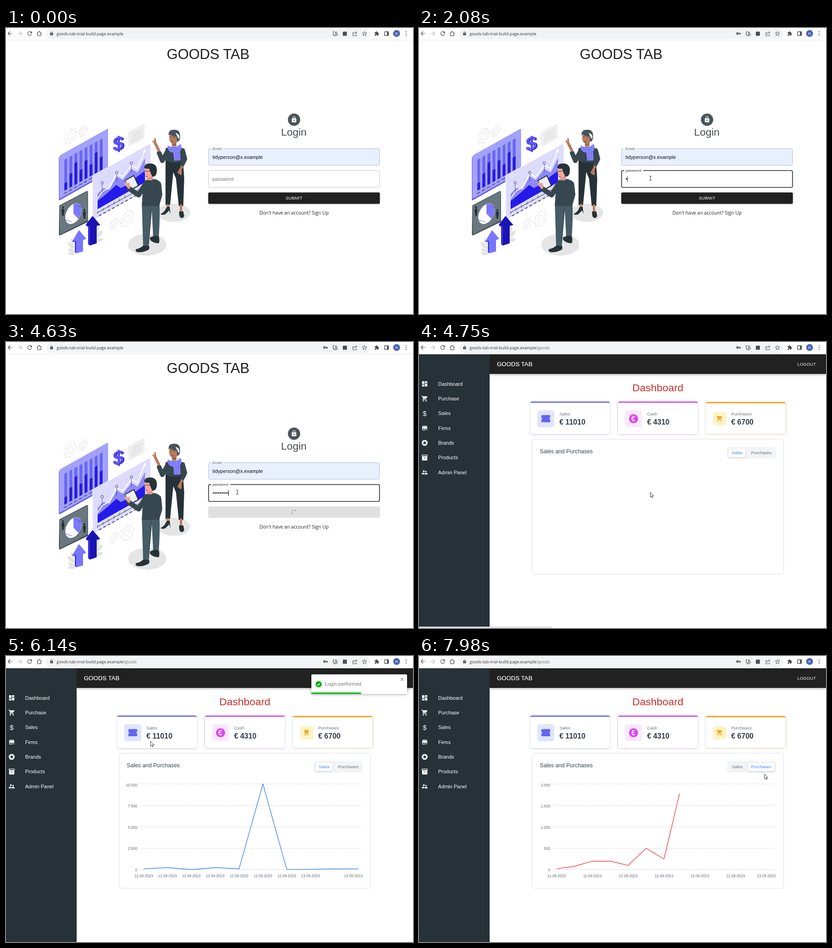
These frames come from a looping animation (893 by 627 pixels, 8 s). An HTML page:

```html
<!DOCTYPE html>
<html lang="en">
<head>
<meta charset="utf-8">
<title>Goods dashboard</title>
<style>
html, body { margin: 0; width: 100%; height: 100%; overflow: hidden; background: #fff; }
svg { display: block; width: 893px; height: 627px; font-family: "Liberation Sans", Arial, sans-serif; }
.ui { font-family: "Open Sans", "Noto Sans", sans-serif; }
.faint { filter: drop-shadow(0 .5px .8px rgba(0,0,0,.1)); }
.soft { filter: drop-shadow(0 1px 1.5px rgba(0,0,0,.2)); }
.deep { filter: drop-shadow(0 1px 3px rgba(0,0,0,.35)); }
</style>
</head>
<body>
<svg id="stage" viewBox="0 0 893 627" xmlns="http://www.w3.org/2000/svg"></svg>
<script>
const LOOP = 8000, BLUE = '#3b82f6', INK = '#263238', SLATE = '#37474f', SKIN = '#b97a5c';
const APP = 'GOODS TAB';

// ---------- drawing helpers ----------
const text = (x, y, s, size, fill, extra = '') =>
  `<text x="${x}" y="${y}" font-size="${size}" fill="${fill}" ${extra}>${s}</text>`;
const rect = (x, y, w, h, fill, r = 0, extra = '') =>
  `<rect x="${x}" y="${y}" width="${w}" height="${h}" rx="${r}" fill="${fill}" ${extra}/>`;
const circle = (x, y, r, fill, extra = '') => `<circle cx="${x}" cy="${y}" r="${r}" fill="${fill}" ${extra}/>`;
const ellipse = (x, y, rx, ry, fill, extra = '') =>
  `<ellipse cx="${x}" cy="${y}" rx="${rx}" ry="${ry}" fill="${fill}" ${extra}/>`;
const shape = (d, fill, extra = '') => `<path d="${d}" fill="${fill}" ${extra}/>`;
const line = (d, stroke, w = 1, extra = '') =>
  `<path d="${d}" fill="none" stroke="${stroke}" stroke-width="${w}" ${extra}/>`;
const limb = (d, stroke, w) => line(d, stroke, w, 'stroke-linecap="round" stroke-linejoin="round"');
const group = (id, body, extra = '') => `<g id="${id}" ${extra}>${body}</g>`;
const icon = (x, y, scale, d, fill) =>
  `<path transform="translate(${x} ${y}) scale(${scale}) translate(-12 -12)" d="${d}" fill="${fill}" fill-rule="evenodd"/>`;
const range = n => [...Array(n).keys()];
const MID = 'text-anchor="middle"', END = 'text-anchor="end"';

const ICON = {
  back: 'M20 11H7.8l5.6-5.6L12 4l-8 8 8 8 1.4-1.4L7.8 13H20z',
  forward: 'M4 11h12.2l-5.6-5.6L12 4l8 8-8 8-1.4-1.4 5.6-5.6H4z',
  reload: 'M17.65 6.35A8 8 0 1 0 19.73 14h-2.08A6 6 0 1 1 12 6c1.66 0 3.14.69 4.22 1.78L13 11h7V4z',
  home: 'M12 3L2 12h3v9h14v-9h3zM7 19v-8.8l5-4.5 5 4.5V19z',
  lock: 'M18 8h-1V6a5 5 0 0 0-10 0v2H6a2 2 0 0 0-2 2v10a2 2 0 0 0 2 2h12a2 2 0 0 0 2-2V10a2 2 0 0 0-2-2zm-6 9a2 2 0 1 1 0-4 2 2 0 0 1 0 4zm3.1-9H8.9V6a3.1 3.1 0 0 1 6.2 0z',
  key: 'M12.65 10A6 6 0 1 0 12.65 14H17v4h4v-4h2v-4zM7 14a2 2 0 1 1 0-4 2 2 0 0 1 0 4z',
  puzzle: 'M20.5 11H19V7a2 2 0 0 0-2-2h-4V3.5a2.5 2.5 0 0 0-5 0V5H4a2 2 0 0 0-2 2v3.8h1.5a2.7 2.7 0 0 1 0 5.4H2V20a2 2 0 0 0 2 2h3.8v-1.5a2.7 2.7 0 0 1 5.4 0V22H17a2 2 0 0 0 2-2v-4h1.5a2.5 2.5 0 0 0 0-5z',
  dashboard: 'M3 13h8V3H3zm0 8h8v-6H3zm10 0h8V11h-8zm0-18v6h8V3z',
  cart: 'M9 20a2 2 0 1 1-4 0 2 2 0 0 1 4 0zM1 2v2h2l3.6 7.6-1.35 2.44A2 2 0 0 0 7 17h12v-2H7.4l1-2h7.2c.75 0 1.4-.4 1.7-1L21 5.5A1 1 0 0 0 20 4H5.2l-.9-2zM19 20a2 2 0 1 1-4 0 2 2 0 0 1 4 0z',
  store: 'M20 4H4v2h16zm1 10v-2l-1-5H4l-1 5v2h1v6h10v-6h4v6h2v-6zm-9 4H6v-4h6z',
  star: 'M12 2a10 10 0 1 0 0 20 10 10 0 1 0 0-20zm4.24 16L12 15.45 7.77 18l1.12-4.81-3.73-3.23 4.92-.42L12 5l1.92 4.53 4.92.42-3.73 3.23z',
  box: 'M20 2H4a2 2 0 0 0-2 2v3c0 .7.4 1.3 1 1.7V20a2 2 0 0 0 2 2h14a2 2 0 0 0 2-2V8.7c.6-.4 1-1 1-1.7V4a2 2 0 0 0-2-2zm-5 12H9v-2h6zm5-7H4V4h16z',
  people: 'M16.5 12a2.5 2.5 0 1 0 0-5 2.5 2.5 0 0 0 0 5zM9 11a3 3 0 1 0 0-6 3 3 0 0 0 0 6zm7.5 3c-1.8 0-5.5.9-5.5 2.75V19h11v-2.25c0-1.85-3.7-2.75-5.5-2.75zM9 13c-2.3 0-7 1.17-7 3.5V19h7v-2.25c0-.85.3-2.3 2.4-3.5z',
  ticket: 'M22 10V6a2 2 0 0 0-2-2H4a2 2 0 0 0-2 2v4a2 2 0 0 1 0 4v4a2 2 0 0 0 2 2h16a2 2 0 0 0 2-2v-4a2 2 0 0 1 0-4z'
};

// ---------- browser bar ----------
function browserBar() {
  const tint = '#4d5156';
  return rect(0, 0, 893, 27, '#fff') + rect(0, 26, 893, 1, '#e2e4e6') + rect(88, 2, 711, 22, '#f1f3f4', 11) +
    icon(8.5, 12, .62, ICON.back, tint) + icon(30.5, 12, .62, ICON.forward, '#b9bcbf') +
    icon(52, 12, .62, ICON.reload, tint) + icon(73, 12, .6, ICON.home, tint) + icon(100, 12, .4, ICON.lock, tint) +
    `<text class="ui" x="111" y="15.6" font-size="9" fill="#303236">goods-tab-trial-build.page.example<tspan id="urlPath" fill="#6b6f73">/goods</tspan></text>` +
    group('key', icon(701, 12, .46, ICON.key, tint)) +
    line('M721 8h-3v7h9v-3M719 17h7M724 7v5m-2-2l2 2.5l2-2.5', tint, 1.2) +
    rect(739, 8, 9, 9, tint, 1) +
    line('M764 10h-3v7h8v-3M763.5 14q.5-4 5-4h1M767 7.5l3 2.5l-3 2.5', tint) +
    line('M786.5 7.5l1.4 3.2 3.5.3-2.7 2.3.8 3.4-3-1.8-3 1.8.8-3.4-2.7-2.3 3.5-.3z', tint) +
    icon(813.5, 12.3, .46, ICON.puzzle, tint) +
    rect(830.7, 8.2, 8.6, 8, 'none', .5, `stroke="${tint}" stroke-width="1.4"`) + rect(836, 8, 3.5, 8, tint) +
    circle(857, 12, 7.6, '#4a63b5') + text(857, 14.9, 'R', 8, '#fff', MID) +
    [8, 12, 16].map(y => circle(878, y, 1.1, tint)).join('');
}

// ---------- login illustration ----------
function gear(x, y, r) {
  const rim = range(32).map(i => {
    const a = (i - .5) * Math.PI / 16, q = i % 4 < 2 ? r : r * .76;
    return `${(q * Math.cos(a)).toFixed(1)} ${(q * Math.sin(a)).toFixed(1)}`;
  }).join('L');
  return `<g transform="matrix(.87 -.5 0 1 ${x} ${y})" fill="#fff" stroke="#dcdcdc">` +
    `<path d="M${rim}z"/><circle r="${r * .4}"/></g>`;
}

function boards() {
  const darkTops = [66, 52, 34, 56, 42, 57, 37, 53];
  const bars = darkTops.map((top, i) => {
    const x = 11 + 11.1 * i;
    return rect(x, 14, 6.2, 68, '#6967f3') + rect(x, top, 6.2, 82 - top, '#271bdc');
  }).join('');
  const barBoard = `<g transform="matrix(1 -.56 0 1 117 281)">` +
    rect(-1, 1, 107, 96, '#625aeb', 3) + rect(0, -1, 107, 95, '#a2a1fb', 3) + bars +
    line('M10 88H97', INK, 1.4, 'stroke-dasharray="7 4"') + '</g>';

  const areaBoard = `<g transform="matrix(1 -.56 0 1 190 324)">` +
    rect(0, 0, 127.5, 98, '#dddcfd', 3, 'stroke="#fff"') +
    range(5).map(i => line(`M11 ${18 + i * 14}H117`, '#cbc9f7', .7)).join('') + '</g>' +
    shape('M201 397V364L213 351L227 354L243 325L256 333L275 309L289 317L305 285V338z', '#8d89f8') +
    shape('M201 397V379L214 369L229 356L242 344L252 351L267 343L281 331L305 313V338z', '#241bea') +
    line('M201 374L212 358L227 350L243 319L256 326L275 301L288 308L304 270', '#fff', 2) +
    shape('M305 264l2 9-7-2z', '#fff') +
    [[211, 339], [243, 317], [275, 296]].map(([x, y]) =>
      circle(x, y, 2.7, '#e8e7ff', 'stroke="#3730a3"') + line(`M${x} ${y + 3}V${y + 20}`, '#3730a3', .8)).join('') +
    line('M200 405L300 350', INK, 1) + line('M201 402v6m12-13v6m12-13v6m12-13v6m12-13v6m12-13v6', INK, .8) +
    line('M204 412L296 361', INK, 1.6, 'stroke-dasharray="6 5"');

  const person = (x, y) => circle(x, y - 9, 2.2, INK) + rect(x - 3, y - 6, 6, 10, INK, 2) + rect(x - 2, y + 2, 4, 8, INK);
  const pieBoard = shape('M117 389L178 357L180 359V425L118 455L116 453z', '#3f4d54') +
    shape('M118 390L179 358V422L118 453z', '#69787f') +
    `<g transform="matrix(1 -.45 0 1.18 148 407)">${circle(0, 0, 18, '#fff')}` +
    shape('M0 0V-18A18 18 0 0 1 11 14z', '#7b78fb') + '</g>' +
    line('M130 420l14 5M157 390l11 4', '#3e36d8', .8) + person(125, 402) + person(172, 408);

  return barBoard + areaBoard + pieBoard;
}

function woman() {
  return ellipse(368, 405, 36, 20, '#e5e5e5') +
    shape('M350 288L388 288L391 330L389 390H379L373 330L367 316L360 388H350L350 330z', INK) +
    limb('M355 388v5M384 389v16', SKIN, 5) +
    shape('M339 408q10-5 13-15l7-2 2 17-3-8-8 8q-6 3-11 0zM380 402h9l2 10q-2 6-8 4-4-4-3-14z', INK) +
    limb('M355 269L343 291L336 274', SLATE, 10) +
    limb('M335 268L328 254', SKIN, 6) + limb('M328 254l-5-6M328 252l-1-9', SKIN, 3.5) +
    shape('M350 264Q369 256 388 264L391 291Q370 300 351 291z', SLATE) +
    limb('M388 268L393 287L386 301', SLATE, 9) + limb('M386 304L379 317M383 310l0 10', SKIN, 5) +
    rect(364, 247, 10, 12, '#a0654a') + ellipse(368, 241, 10, 13, SKIN) +
    shape('M357 236Q355 223 369 223Q382 223 382 236Q383 247 376 250L374 238Q365 238 360 233z', '#46545b') +
    shape('M372 230q11 3 8 13-3-1-4-5z', '#f2f2f2') +
    line('M360 238l3-1M367 239l4 1M362 249q3 1 5 0', INK, .9) +
    shape('M355 257Q369 267 383 254Q388 263 382 270L383 290L369 291L367 273Q353 272 355 257z', '#8583fb') +
    line('M358 264q11 8 23-1M373 272v16M378 271v15', '#6966e8', .8);
}

function man() {
  return ellipse(310, 475, 42, 24, '#e5e5e5') +
    shape('M298 384H337Q338 420 335 461H323L320 400L313 482H301z', '#465c66') +
    line('M319 390L313 470', SLATE, 1) +
    shape('M285 485q10-2 16-8l13 1q2 7-3 9-12 6-24 4-4-3-2-6zM316 459l8-3h11q3 10 0 16-14-1-19-8z', INK) +
    shape('M304 335Q326 325 340 339L342 370L336 390H298L300 355z', SLATE) +
    limb('M338 345L340 366', SLATE, 6) +
    shape('M260 334L281 322L292 346L272 357z', INK) + shape('M262 335L280 325L289 345L273 354z', '#f5f5f8') +
    range(4).map(i => line(`M${267 + 2 * i} ${336 + 4.5 * i}l11-6`, '#c9cad2', .8)).join('') +
    limb('M306 342L291 366L270 352', SLATE, 11) + limb('M268 348L262 341M270 350l-1-8', '#eda195', 5) +
    rect(309, 322, 13, 12, '#e3938a', 3) + ellipse(313, 315, 9, 13, '#f2a99d') +
    shape('M303 306Q304 297 316 297Q332 297 331 314Q330 327 321 326L317 317L314 308Q307 310 303 306z', INK) +
    line('M304 314h8l5-1M306 325q3 1 5 0', INK, 1);
}

function illustration() {
  const leaf = (x, y, a, r) => `<ellipse cx="0" cy="${-r}" rx="${r * .45}" ry="${r}" fill="#e2e2e2" stroke="#f8f8f8" transform="translate(${x} ${y}) rotate(${a})"/>`;
  const dollar = (x, y, fill) =>
    `<text transform="matrix(1 -.25 0 1 ${x} ${y})" text-anchor="middle" font-size="43" font-weight="700" fill="${fill}">$</text>`;
  return gear(141, 237, 16) + gear(169, 226, 11) + gear(237, 429, 11) + gear(266, 418, 17) +
    shape('M269 229L303 211V241L270 259V247L265 242L269 239z', '#f0f0f0', 'stroke="#e2e2e2"') +
    range(4).map(i => line(`M275 ${234 + 5.5 * i}L298 ${221 + 5.5 * i}`, '#cfcfcf', 1.4)).join('') +
    boards() + dollar(248.5, 269, '#2d22cf') + dollar(246, 268, '#5b54f5') +
    leaf(152, 493, -60, 9) + leaf(150, 484, -45, 10) + leaf(148, 474, -20, 7) + leaf(152, 496, -80, 8) +
    leaf(196, 460, 45, 11) + leaf(196, 468, 70, 9) + leaf(197, 452, 20, 9) +
    shape('M190 412L207 432L199 434V472L184 477V437L175 431z', '#1b12b4') + shape('M190 412L175 431L184 434V477L180 474V436L175 433z', '#3a31e0') +
    shape('M160 443L176 462L169 465V490L154 494V469L146 467z', '#7876fb') + shape('M160 443L146 466L154 467V494L151 491V469L145 468z', '#443ce0') +
    woman() + man();
}

function loginPage() {
  return text(443.5, 67.5, APP, 31, '#1f1f1f', MID) + illustration() +
    circle(632, 201, 13.5, '#4b545b') + icon(632, 200.5, .62, ICON.lock, '#fff') +
    text(603.5, 236, 'Login', 22.9, '#474c51') +
    rect(444.5, 264.5, 375, 36.5, '#e8f0fe', 3, 'stroke="#b4bccd"') + rect(450, 263, 27, 2, '#fff') +
    text(453, 266.5, 'Email', 8.1, '#666') + text(453, 286.6, 'tidyperson@x.example', 10.85, '#111') +
    rect(444.5, 312.5, 375, 37, '#fff', 3, 'id="field"') + rect(450, 310, 42, 4, '#fff', 0, 'id="notch"') +
    text(453, 334.5, 'password', 10.8, '#777', 'id="label"') +
    group('dots', range(9).map(i => circle(455.2 + 3.88 * i, 331, 1.45, '#111')).join('')) +
    rect(0, 325, 1, 12, '#111', 0, 'id="caret"') +
    rect(443.7, 360.6, 376.6, 25, '#212121', 3, 'id="button" class="soft"') +
    text(632, 376.3, 'SUBMIT', 9.3, '#fff', MID + ' id="submit" letter-spacing=".27"') +
    circle(632, 373, 4.8, 'none', 'id="spinner" stroke="#9e9e9e" stroke-width="1.2" stroke-dasharray="20 11"') +
    text(632, 408.5, "Don't have an account? Sign Up", 10.4, '#222', MID + ' class="ui"');
}

// ---------- dashboard ----------
function card(x, y, w, h, color, label, value, textX) {
  return rect(x, y, w, h, color, 5, 'class="faint"') +
    shape(`M${x + .5} ${y + 3}H${x + w - .5}V${y + h - 5}q0 4.5-4.5 4.5H${x + 5}q-4.5 0-4.5-4.5z`, '#fff') +
    shape(`M${x + .5} ${y + 3}V${y + h - 5}q0 4.5 4.5 4.5H${x + w - 5}q4.5 0 4.5-4.5V${y + 3}`, '#fff', 'stroke="#e3e6ea" stroke-width="1.2"') +
    text(textX, 161, label, 9.5, '#6b7280') + text(textX, 180.5, value, 16.05, '#303a4b', 'font-weight="700"');
}

const plotY = (v, max) => 468.5 - 188 * v / max;
const plotLine = (data, step, max) => 'M' + data.map((v, i) => `${302 + step * i} ${plotY(v, max).toFixed(1)}`).join('L');
const SALES = [110, 240, 10, 240, 100, 10000, 30, 50, 90, 100], SALES_STEP = 52.33;
const BUYS = [20, 80, 200, 200, 100, 500, 250, 2000], BUYS_STEP = 39.25;

function chart(id, ticks, dates, path, color) {
  return group(id,
    ticks.map((s, i) => text(288, 286 + 46.4 * i, s, 8.2, '#5f6673', END)).join('') +
    dates.map(([d, x]) => text(x, 484.5, d, 8.2, '#5f6673', MID)).join('') +
    line(path, color, 1.4, `id="${id}Line" stroke-linejoin="round"`));
}

function dashboardPage() {
  const menu = [['Dashboard', 'dashboard'], ['Purchase', 'cart'], ['Sales'], ['Firms', 'store'], ['Brands', 'star'], ['Products', 'box'], ['Admin Panel', 'people']];
  const items = menu.map(([name, sign], i) => {
    const y = 91.7 + 32.35 * i;
    return (sign ? icon(12.5, y, .64, ICON[sign], '#fff') : text(12.3, y + 5.4, '$', 15, '#fff', MID)) + text(42, y + 4, name, 11, '#fff');
  }).join('');
  const salesDates = range(7).map(i => ['12.09.2023', 302 + SALES_STEP * i]).concat([['13.09.2023', 668], ['13.09.2023', 762]]);
  const buyDates = range(7).map(i => [(i < 2 ? 11 : i < 6 ? 12 : 13) + '.09.2023', i < 6 ? 302 + 78.5 * i : 762]);
  return rect(155, 27, 738, 43, '#212121', 0, 'class="deep"') + rect(0, 27, 155, 600, INK) + rect(0, 69.5, 155, 1, '#202b30') + items +
    text(171, 53, APP, 13.3, '#fff', 'stroke="#fff" stroke-width=".2"') +
    text(830, 51.6, 'LOGOUT', 9.3, '#fff', 'letter-spacing=".27"') +
    text(468, 107.8, 'Dashboard', 22.9, '#cb2f2b') +
    card(243, 130.5, 177, 73, '#636bea', 'Sales', '€ 11010', 308) +
    card(435.5, 130.5, 177.5, 73, '#d14be6', 'Cash', '€ 4310', 500.5) +
    card(628, 131.5, 177.5, 71, '#f29d0f', 'Purchases', '€ 6700', 685) +
    rect(259.5, 149.5, 37.5, 37.5, '#dfe6fe', 6) + icon(278.2, 168.2, .98, ICON.ticket, '#6366f1') +
    rect(452, 149.5, 37.5, 37.5, '#fae8ff', 6) + circle(470.7, 168.2, 10, '#d946ef') +
    text(470.3, 174, '€', 16, '#fae8ff', MID + ' font-weight="700"') +
    rect(645, 153.5, 29.5, 29.5, '#fef3c7', 5) + icon(659.3, 168, .62, ICON.cart, '#f59e0b') +
    rect(248.5, 213.5, 551, 295.5, '#fff', 5, 'stroke="#e6e8eb" class="faint"') +
    text(265, 243.5, 'Sales and Purchases', 12.3, '#374151') +
    rect(676, 230, 107, 25.5, '#f3f4f6', 5) + rect(679, 234, 37, 18.5, '#fff', 4, 'id="pill" class="soft"') +
    text(686, 246.3, 'Sales', 9.5, '#6b7280', 'id="tabSales"') + text(728.5, 246.3, 'Purchases', 9.5, '#6b7280', 'id="tabBuys"') +
    group('plot',
      range(5).map(i => line(`M296 ${280.5 + 47 * i}H778`, '#c6c6c6', 1, 'stroke-dasharray="2 2"')).join('') +
      chart('sales', ['10.000', '7.500', '5.000', '2.500', '0'], salesDates, plotLine(SALES, SALES_STEP, 10000), BLUE) +
      chart('buys', ['2.000', '1.500', '1.000', '500', '0'], buyDates, plotLine(BUYS, BUYS_STEP, 2000), '#ef4444')) +
    group('tip',
      line('M0 280V468', '#d5d8dd') + circle(0, 467, 2.6, BLUE, 'id="tipDot" stroke="#fff"') +
      rect(7, 277.5, 92, 50.5, '#fff', 4, 'stroke="#e1e4e8" class="soft"') + line('M7 302.5H99', '#e5e7eb') +
      text(19, 293.4, '12.09.2023', 9.6, '#4b5563') + circle(22, 315, 3, BLUE) +
      text(32, 318.3, 'sale', 9.6, '#6b7280') + text(87.5, 318.3, '100', 9.6, '#374151', END + ' id="tipValue"')) +
    shape('M0 624H290q3 0 3 3H0z', '#dfe1e5', 'id="status"') +
    group('toast',
      rect(0, 0, 210, 43, '#fff', 2.5, 'class="deep"') + circle(16, 21.6, 6.8, '#07b00f') +
      line('M12.8 21.8l2.3 2.3l4-4.6', '#fff', 1.4) + text(29.3, 25.2, 'Login performed', 11, '#777') +
      line('M196 8l6 6m0-6l-6 6', '#9a9a9a', 1.3) + rect(0, 39.7, 210, 3.3, '#07bc0c', 0, 'id="bar"'));
}

const pointers =
  group('arrow', shape('M0 0V10.5L2.4 8.3L4 12L5.7 11.2L4.1 7.6H7.4z', '#fff', 'stroke="#222" stroke-width=".9"')) +
  group('beam', line('M-2.5-5q2 0 2.5 1q.5-1 2.5-1M0-4V4M-2.5 5q2 0 2.5-1q.5 1 2.5 1', '#222')) +
  group('hand', shape('M-1.2 1q1.2-2 2.4 0V6L5 6.6Q8.4 7 8.3 9L7.5 14.5H.6L-2.6 10Q-4 7.6-2.6 7.6L-1.2 8.8z', '#fff', 'stroke="#222" stroke-width=".9" stroke-linejoin="round"'));

const stage = document.getElementById('stage');
stage.innerHTML = rect(0, 0, 893, 627, '#fff') + group('login', loginPage()) + group('dash', dashboardPage()) + browserBar() + pointers;
const el = Object.fromEntries([...stage.querySelectorAll('[id]')].map(n => [n.id, n]));

// ---------- motion ----------
const clamp = v => Math.min(1, Math.max(0, v));
const span = (t, a, b) => clamp((t - a) / (b - a));
const smooth = p => p * p * (3 - 2 * p);
const show = (node, on) => node.setAttribute('display', on ? 'inline' : 'none');
const set = (node, attrs) => { for (const k in attrs) node.setAttribute(k, attrs[k]); };

// CSS cubic-bezier timing, solved by bisection
function bezier(x1, y1, x2, y2) {
  const at = (a, b, s) => 3 * a * s * (1 - s) ** 2 + 3 * b * s * s * (1 - s) + s ** 3;
  return p => {
    let low = 0, high = 1;
    for (let i = 0; i < 20; i++) {
      const s = (low + high) / 2;
      if (at(x1, x2, s) < p) low = s; else high = s;
    }
    return at(y1, y2, high);
  };
}
const ease = bezier(.25, .1, .25, 1), bounce = bezier(.215, .61, .355, 1), decelerate = bezier(0, 0, .2, 1);

// keys: [time, ...values]
function track(t, keys, easing) {
  const i = keys.findIndex(k => t < k[0]);
  if (i < 0) return keys[keys.length - 1].slice(1);
  if (i === 0) return keys[0].slice(1);
  const a = keys[i - 1], b = keys[i], p = easing(span(t, a[0], b[0]));
  return a.slice(1).map((v, j) => v + (b[j + 1] - v) * p);
}

const POINTER = [[70, 877, 511], [530, 508, 329.5], [5300, 507.5, 329.5], [5650, 312, 203], [5900, 306, 190], [6490, 337, 182],
  [6800, 560, 172], [7100, 710, 240], [7350, 711, 241], [7560, 745, 242], [7700, 749, 244], [7980, 758, 259]];
const TYPED = [2080, 2350, 2620, 2750, 3020, 3350, 3610, 3880, 4080];
// shift and opacity
const TOAST_IN = [[0, 1968, 0], [.6, -16.4, 1], [.75, 6.6, 1], [.9, -3.3, 1], [1, 0, 1]];
const TOAST_OUT = [[0, 0, 1], [.2, -13.1, 1], [1, 1312, 0]];
const FOCUS = 730, SEND = 4210, OPEN = 4640, LEAVE = 6980, SWITCH = 7600;

function reveal(path, length) {
  path.setAttribute('stroke-dasharray', `${length} 2000`);
}

function drawLogin(t, x, y) {
  const focus = decelerate(span(t, FOCUS, FOCUS + 200)), focused = t >= FOCUS;
  const hover = t >= 70 && x > 444 && x < 820 && y > 312 && y < 350;
  set(el.field, { stroke: focused || hover ? '#212121' : '#c4c4c4', 'stroke-width': focused ? 1.6 : 1 });
  set(el.label, { y: 334.5 - 19.7 * focus, 'font-size': 10.8 - 2.7 * focus, fill: focused ? '#333' : '#777' });
  set(el.notch, { width: 42 * focus });
  const typed = TYPED.filter(k => t >= k).length;
  [...el.dots.children].forEach((dot, i) => show(dot, i < typed));
  show(el.caret, t >= 750 && !(t >= 1280 && t < 1810));
  set(el.caret, { x: 453 + 3.88 * typed });

  const sending = t >= SEND;
  set(el.button, { fill: sending ? '#e0e0e0' : '#212121', class: sending ? '' : 'soft' });
  show(el.submit, !sending);
  show(el.spinner, sending);
  set(el.spinner, { transform: `rotate(${(t - SEND) * 360 / 1400} 632 373)` });
}

function drawDashboard(t, x, y) {
  const buys = t >= SWITCH;
  set(el.pill, { x: buys ? 722 : 679, width: buys ? 58 : 37 });
  set(el.tabSales, { fill: buys ? '#6b7280' : BLUE });
  set(el.tabBuys, { fill: buys ? BLUE : '#6b7280' });
  show(el.plot, t >= 4770);
  show(el.sales, !buys);
  show(el.buys, buys);
  reveal(el.salesLine, 760 * ease(span(t, 4770, 5220)));
  reveal(el.buysLine, 643 * ease(span(t, SWITCH + 50, SWITCH + 950)));

  show(el.tip, t >= 4970 && y > 275 && y < 470 && x > 290);
  const i = Math.max(0, Math.min(9, Math.round((x - 302) / SALES_STEP)));
  set(el.tip, { transform: `translate(${302 + SALES_STEP * i} 0)` });
  set(el.tipDot, { cy: plotY(SALES[i], 10000) });
  el.tipValue.textContent = SALES[i];

  const [shift, opacity] = t < LEAVE ? track((t - OPEN) / 700, TOAST_IN, bounce) : track((t - LEAVE) / 700, TOAST_OUT, ease);
  show(el.toast, shift < 240);
  set(el.toast, { transform: `translate(${670 + shift} 40.3)`, opacity });
  set(el.bar, { width: 210 * (1 - span(t, OPEN + 725, LEAVE)) });
  show(el.status, t >= OPEN && t < 4950);
}

function draw(t) {
  const [x, y] = track(t, POINTER, smooth), open = t >= OPEN;
  show(el.login, !open);
  show(el.dash, open);
  show(el.urlPath, open);
  show(el.key, t >= 2080);
  if (open) drawDashboard(t, x, y); else drawLogin(t, x, y);

  const beam = !open && x > 444 && x < 820 && y > 312 && y < 350;
  const hand = open && x > 679 && x < 780 && y > 234 && y < 252;
  show(el.beam, beam);
  show(el.hand, hand);
  show(el.arrow, t >= 70 && !beam && !hand);
  for (const p of [el.beam, el.hand, el.arrow]) set(p, { transform: `translate(${x} ${y})` });
}

function frame() {
  draw(performance.now() % LOOP);
  requestAnimationFrame(frame);
}
frame();
</script>
</body>
</html>
```
